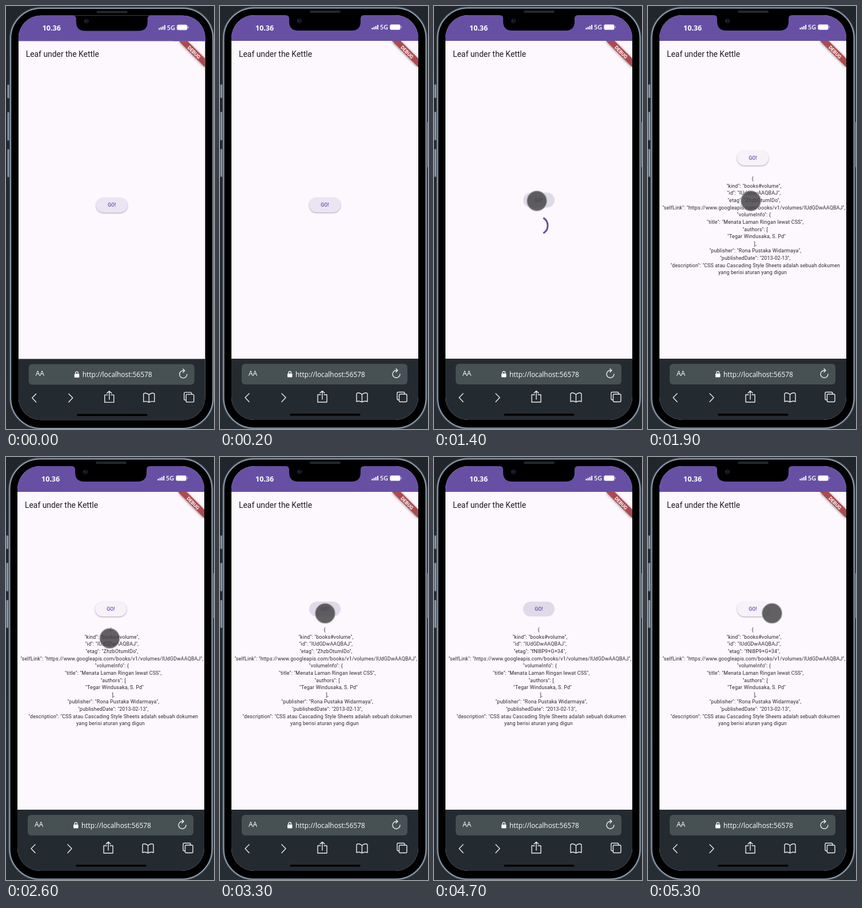
An HTML page for the animation above (5.4 s loop, 364x740 px).

```html
<!DOCTYPE html>
<html lang="id">
<head>
<meta charset="utf-8">
<style>
  html, body { margin: 0; width: 100%; height: 100%; overflow: hidden; background: #22292e; }
  svg { display: block; }
  text { font-family: Roboto, sans-serif; }
  .system { font-family: "Open Sans", sans-serif; fill: #fff; }
  .icons { fill: none; stroke: #e9eced; stroke-width: 1.4; stroke-linecap: round; stroke-linejoin: round; }
  .raised { filter: drop-shadow(0 1px 1px rgba(40, 30, 60, .4)); }
  #json text { font-size: 8.9px; letter-spacing: .16px; fill: #2b282e; text-anchor: middle; }
</style>
</head>
<body>
<svg width="364" height="740" viewBox="0 0 364 740">
  <defs>
    <clipPath id="screen"><rect x="20" y="16" width="327" height="708" rx="40"/></clipPath>
    <linearGradient id="backdrop" x2="0" y2="1">
      <stop stop-color="#20262b"/><stop offset="1" stop-color="#272e33"/>
    </linearGradient>
  </defs>
  <rect width="364" height="740" fill="url(#backdrop)"/>

  <g id="phone">
    <g fill="#8392a1" stroke="#39434c" stroke-width=".6">
      <rect x="0.5" y="137" width="4" height="24" rx="1.5"/>
      <rect x="0.5" y="185" width="4" height="50" rx="1.5"/>
      <rect x="0.5" y="250" width="4" height="49" rx="1.5"/>
      <rect x="361" y="203" width="4" height="79" rx="1.5"/>
    </g>
    <rect x="6" y="3" width="355" height="736" rx="54" stroke="#46515c" stroke-width="4"/>
    <rect x="6.5" y="3.5" width="354" height="735" rx="53" stroke="#8c9bab" stroke-width="2"/>
    <rect x="157" y="8" width="54" height="4" rx="2" fill="#25272a"/>

    <g clip-path="url(#screen)">
      <rect x="20" y="16" width="327" height="708" fill="#fdf7fe"/>
      <rect x="20" y="16" width="327" height="45" fill="#6750a4"/>
      <path d="M115 16Q121 16 121 22V27Q121 43 137 43H230Q246 43 246 27V22Q246 16 252 16Z"/>
      <rect x="20" y="617" width="327" height="107" fill="#242b30"/>
    </g>
    <circle cx="139" cy="26" r="4.5" fill="#10131c"/>
    <circle cx="137" cy="26" r="1.2" fill="#343c52"/>
    <circle cx="141.5" cy="26" r="1" fill="#2b3145"/>

    <text class="system" x="62" y="42.5" font-size="12.5" font-weight="700">10.36</text>
    <path d="M266.5 41V38M269.7 41V36.5M272.9 41V35M276.1 41V33" stroke="#fff" stroke-width="2"/>
    <text class="system" x="280" y="41.3" font-size="11" font-weight="600">5G</text>
    <rect x="297.5" y="32.5" width="18" height="9" rx="2.5" fill="#fff" stroke="#c9c0e0"/>
    <path d="M317.5 35.5V38.5" stroke="#c9c0e0" stroke-width="1.3"/>

    <text x="33" y="89" font-size="13.9" fill="#1d1b20">Leaf under the Kettle</text>
    <g clip-path="url(#screen)">
      <path d="M301 61L347 107V92L316 61Z" fill="#ae4a4f" style="filter:drop-shadow(0 1px 2px rgba(0,0,0,.5))"/>
      <rect x="290" y="51" width="57" height="10" fill="#6750a4"/>
    </g>
    <text transform="translate(327.3 80.7) rotate(45)" y="3" font-size="8.7" font-weight="700" fill="#fff" text-anchor="middle">DEBUG</text>

    <g id="button">
      <rect x="156" y="-13" width="55" height="26" rx="13"/>
      <text x="183.5" y="3" font-size="8.8" font-weight="500" fill="#6750a4" text-anchor="middle">GO!</text>
    </g>
    <path id="spinner" fill="none" stroke="#6351a0" stroke-width="3"/>
    <g id="json"></g>
    <circle id="pointer" r="17.3" fill="#424042" fill-opacity=".82" stroke="#a3a6a3" stroke-width="1.3"/>

    <rect x="38" y="626" width="290" height="36" rx="6" fill="#475153"/>
    <g class="system" font-size="12">
      <text class="system" x="50" y="647">AA</text>
      <text class="system" x="132" y="648.5" font-size="11.9">http://localhost:56578</text>
    </g>
    <rect x="118" y="643" width="8.5" height="6.5" rx="1" fill="#fff"/>
    <g class="icons">
      <path d="M120 643V641.5A2.25 2.25 0 0 1 124.500 641.500V643"/>
      <path d="M315 644A6.500 6.500 0 1 1 308.500 637.500H310M308 634.500L311 637.500L308 640.500"/>
      <path d="M51 678L44 685L51 692.500M108 678L115 685L108 692.500"/>
      <path d="M176 680H171V693H187V680H182M179 688V673.500M175 677L179 673.500L183 677"/>
      <path d="M248.500 679.500Q243 675 239 678V692Q244 690 248.500 693Q253 690 258 692V678Q254 675 248.500 679.500V693"/>
      <path d="M313 689H312Q310 689 310 687V677.500Q310 675.500 312 675.500H321Q323 675.500 323 677.500V679"/>
      <rect x="313.500" y="679" width="13.500" height="13.500" rx="2"/>
    </g>
    <path d="M124 715H244" stroke="#000" stroke-width="3.500" stroke-linecap="round"/>
  </g>
</svg>

<script>
const LOOP = 5400, STEP = 100;
const CENTER = { x: 183.5, y: 384 };
const $ = id => document.getElementById(id);

const lines = [
  '{',
  '  "kind": "books#volume",',
  '  "id": "IUdGDwAAQBAJ",',
  '  "etag": "",',
  '  "selfLink": "https://www.googleapis.com/books/v1/volumes/IUdGDwAAQBAJ",',
  '  "volumeInfo": {',
  '    "title": "Menata Laman Ringan lewat CSS",',
  '    "authors": [',
  '      "Tegar Windusaka, S. Pd"',
  '    ],',
  '    "publisher": "Rona Pustaka Widarmaya",',
  '    "publishedDate": "2013-02-13",',
  '    "description": "CSS atau Cascading Style Sheets adalah sebuah dokumen',
  'yang berisi aturan yang digun'
];
const nbsp = line => line.replace(/ /g, '\u00a0');
$('json').innerHTML = lines.map((line, i) =>
  `<text x="183" y="${305.2 + i * 12.62}">${nbsp(line)}</text>`).join('');
const etag = $('json').children[3];

const within = (t, from, to) => t >= from && t < to;
const onRing = degrees => {
  const a = degrees * Math.PI / 180;
  return `${CENTER.x + 15.5 * Math.cos(a)} ${CENTER.y + 15.5 * Math.sin(a)}`;
};

// The arc rotates steadily while its head runs ahead of its tail.
function spinnerPath(elapsed) {
  const start = -90 + 0.3 * elapsed;
  const sweep = 275 * (1 - Math.exp(-elapsed / 175));
  return `M${onRing(start)}A15.5 15.5 0 ${sweep > 180 ? 1 : 0} 1 ${onRing(start + sweep)}`;
}

function pointerAt(t) {
  if (t < 1000 || within(t, 4700, 5200)) return null;
  if (t >= 5300) return [217, 273.5];
  if (t >= 5200) return [332, 273.5];
  const p = Math.min(1, Math.max(0, (t - 2400) / 500));
  const eased = p * p * (3 - 2 * p);
  return [180 + 4 * eased, 341 - 67.5 * eased];
}

function render(t) {
  const loadStart = within(t, 1300, 1600) ? 1300 : within(t, 3600, 4200) ? 3550 : null;
  const loading = loadStart !== null;
  const loaded = t >= 1600 && !loading;
  const hovered = within(t, 1000, 1600) || within(t, 2900, 3600) || within(t, 4200, 4800);

  const shift = Math.max(0, 1 - t / 200);
  $('phone').setAttribute('transform', `translate(${1.7 * shift} ${0.4 * shift})`);

  const button = $('button');
  button.setAttribute('transform', `translate(0 ${loaded ? 266 : loading ? 339.5 : 348})`);
  button.setAttribute('fill', hovered ? '#dfdae9' : t < 1000 ? '#ebe5f3' : '#f7f2fa');
  button.setAttribute('class', hovered ? '' : 'raised');

  $('spinner').setAttribute('d', loading ? spinnerPath(t - loadStart) : '');
  $('json').style.display = loaded ? '' : 'none';
  etag.textContent = nbsp(`  "etag": "${t < 4200 ? 'ZhzbOtumIDo' : 'fNl8P9+G+34'}",`);

  const spot = pointerAt(t);
  $('pointer').style.display = spot ? '' : 'none';
  if (spot) $('pointer').setAttribute('transform', `translate(${spot})`);
}

function tick() {
  render(Math.floor(performance.now() % LOOP / STEP) * STEP);
  requestAnimationFrame(tick);
}
tick();
</script>
</body>
</html>
```
